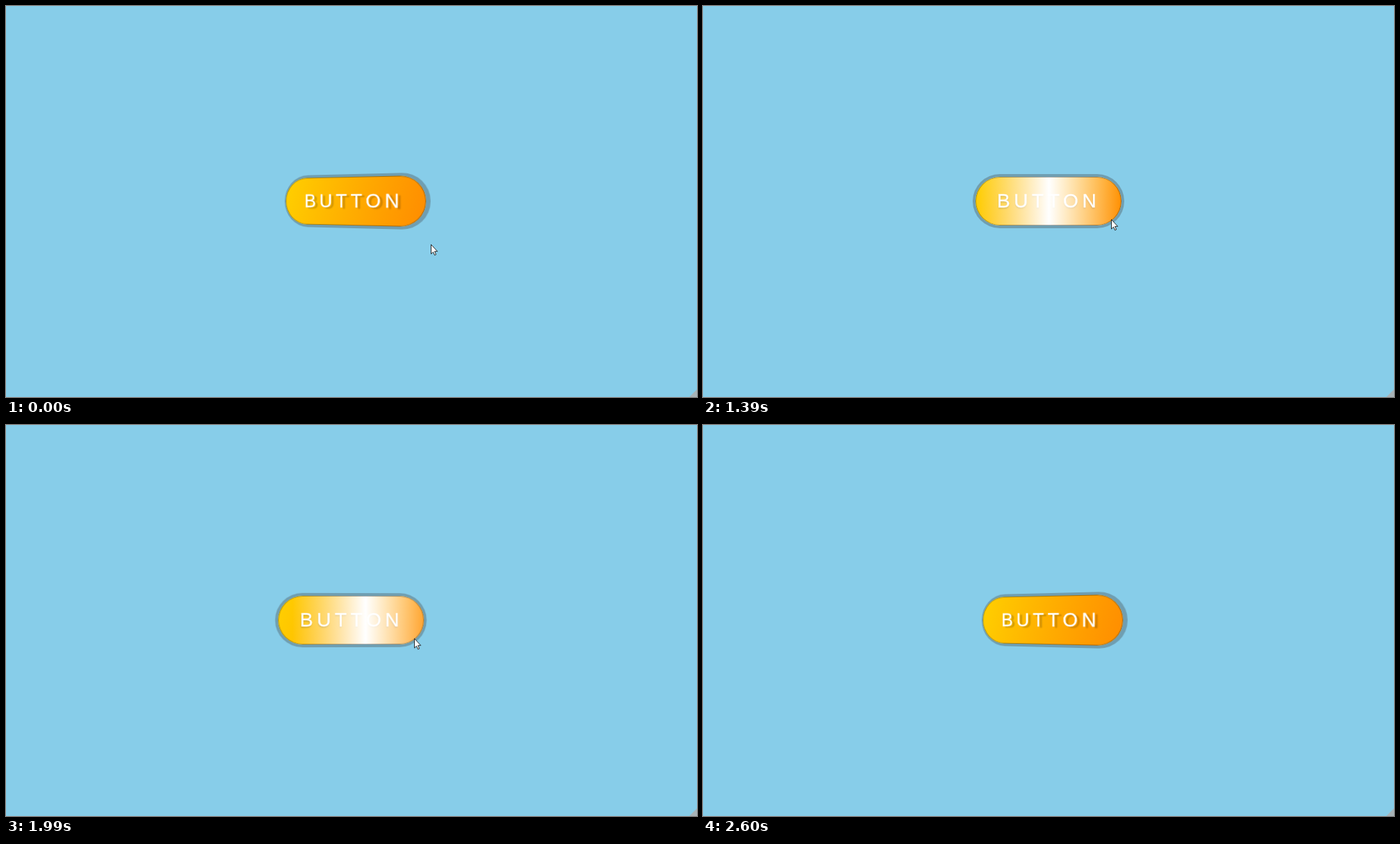
These frames come from a looping animation (994 px wide and 563 px high, 3.35 s). An HTML page:

```html
<!DOCTYPE html>
<html lang="en">
<head>
<meta charset="utf-8">
<title>Button</title>
<style>
/* -1: resting tilt, 1: hover tilt */
@property --turn { syntax: "<number>"; inherits: true; initial-value: -1; }

html, body { margin: 0; width: 100%; height: 100%; overflow: hidden; }
body { position: relative; background: #87cde9; }

.btn {
  position: absolute; left: 392px; top: 246px;
  box-sizing: border-box; width: 210px; height: 70px; padding-left: 31px;
  overflow: hidden; border-radius: 35px;
  background: linear-gradient(105deg, #ffd000, #ff8c00);
  box-shadow: calc(var(--turn) * -2px) 0 0 4px rgba(60, 60, 60, .32);
  color: #fff; font: 28px/70px "Liberation Sans", Arial, sans-serif;
  letter-spacing: .2em; white-space: nowrap;
  -webkit-text-stroke: .3px #fff;
  text-shadow: calc(var(--turn) * -4px) 2px 2px rgba(0, 0, 0, .22);
  transform: perspective(480px) rotateY(calc(var(--turn) * 17deg));
  animation: hover 3350ms infinite paused;
}
.btn::before, .btn::after { content: ""; position: absolute; inset: 0; }
.btn::before {
  z-index: 1; border-radius: inherit;
  box-shadow: inset 0 0 0 1px rgba(0, 0, 0, .32);
}
.btn::after {
  background: linear-gradient(90deg, transparent, #fff, transparent);
  transform: translateX(calc(var(--turn) * 210px));
}
@keyframes hover {
  0%, 37.1% { --turn: -1; animation-timing-function: ease; }
  52.03%, 55.52% { --turn: 1; animation-timing-function: ease; }
  70.45%, 100% { --turn: -1; }
}

svg { position: absolute; left: 0; top: 0; overflow: hidden; }
.cursor {
  fill: #fff; stroke: #111; stroke-width: .9;
  animation: travel 3350ms linear infinite paused;
}
@keyframes travel {
  0%, 26.57% { transform: translate(611px, 343px); animation-timing-function: ease-in-out; }
  41.49%, 59.55% { transform: translate(587px, 307px); }
  62.84% { transform: translate(590px, 319px); }
  66.27% { transform: translate(630px, 372px); }
  72.69% { transform: translate(767px, 516px); }
  77.61%, 100% { transform: translate(866px, 563px); }
}
</style>
</head>
<body>
<div class="btn">BUTTON</div>
<svg width="994" height="563">
  <path d="M994 552L983 563H994Z" fill="#a8b4b8"/>
  <path class="cursor" d="M.5.5V14L3.5 11.2 5.6 15.8 7.6 14.9 5.6 10.3H9.6Z"/>
</svg>
<script>
// The pose is held for HOLD ms at a time, counted from START.
const LOOP = 3350, START = 950, HOLD = 55, SLACK = 6;
const animations = document.getAnimations();
const origin = performance.now();

function frame() {
  const t = (performance.now() - origin) % LOOP;
  const step = Math.floor((t - START + SLACK) / HOLD);
  const held = Math.max(0, START + step * HOLD);
  for (const a of animations) a.currentTime = held;
  requestAnimationFrame(frame);
}
frame();
</script>
</body>
</html>
```
